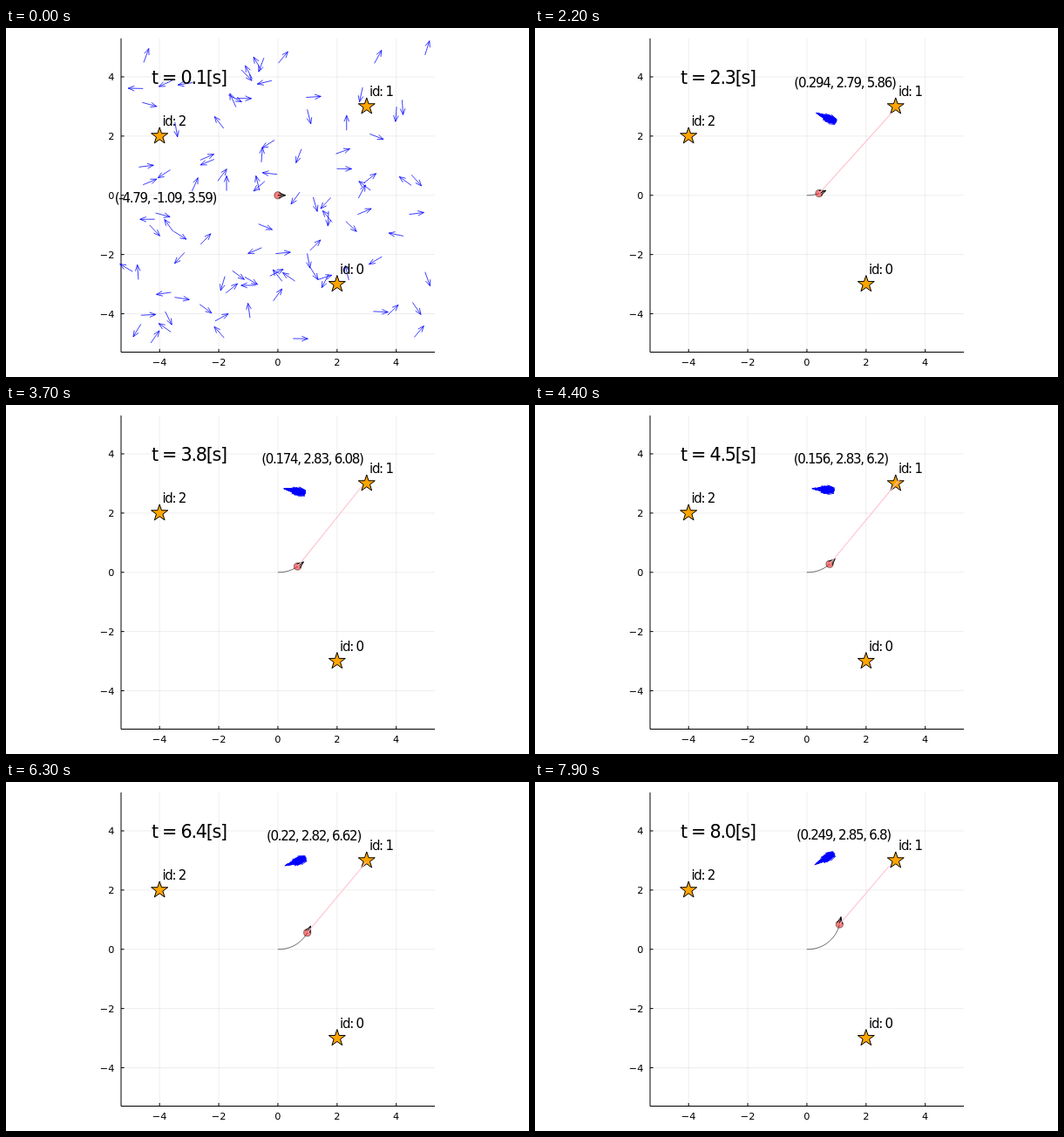
Animation of 600 by 400 pixels, one loop 8 s. Source, as an HTML page:

```html
<!DOCTYPE html>
<html lang="en">
<head>
<meta charset="utf-8">
<title>Particle filter localisation</title>
<style>
  html, body { margin: 0; width: 100%; height: 100%; overflow: hidden; background: #fff; }
  svg { display: block; width: 600px; height: 400px; }
  text { font-family: "DejaVu Sans", sans-serif; fill: #000; }
  .tick { font-size: 11.3px; }
  .note { font-size: 15px; letter-spacing: -.085em; text-anchor: middle; }
  .clock { font-size: 20.7px; letter-spacing: -.06em; text-anchor: middle; }
  path { fill: none; }
</style>
</head>
<body>
<svg id="stage" viewBox="0 0 600 400"></svg>
<script>
const STEP = 100, STEPS = 80, SCALE = 33.94, PARTICLES = 100;
const stage = document.getElementById("stage");
const px = x => 311.95 + x * SCALE;
const py = y => 191.75 - y * SCALE;
const rad = deg => deg * Math.PI / 180;

function add(tag, attrs, text) {
  const node = document.createElementNS("http://www.w3.org/2000/svg", tag);
  for (const key in attrs) node.setAttribute(key, attrs[key]);
  if (text !== undefined) node.textContent = text;
  return stage.appendChild(node);
}

function seeded(seed) {
  return () => {
    seed = (seed + 0x6D2B79F5) | 0;
    let n = Math.imul(seed ^ (seed >>> 15), 1 | seed);
    n = (n + Math.imul(n ^ (n >>> 7), 61 | n)) ^ n;
    return ((n ^ (n >>> 14)) >>> 0) / 4294967296;
  };
}

// Open-headed arrow from a tail point; angle is counterclockwise in radians.
function arrow(x, y, angle, length, head) {
  const at = (along, side) =>
    (x + along * Math.cos(angle) + side * Math.sin(angle)).toFixed(2) + " " +
    (y - along * Math.sin(angle) + side * Math.cos(angle)).toFixed(2);
  const back = length - head, wide = head * .4;
  return `M${at(0, 0)}L${at(length, 0)}M${at(back, wide)}L${at(length, 0)}L${at(back, -wide)}`;
}

// Axes
for (const v of [-4, -2, 0, 2, 4]) {
  const label = String(v).replace("-", "\u2212");
  add("path", { d: `M${px(v)} 12V371.5M132 ${py(v)}H492`, stroke: "#000", "stroke-opacity": .07 });
  add("path", { d: `M${px(v)} 371.5v-3.6M132 ${py(v)}h3.6`, stroke: "#000" });
  add("text", { class: "tick", x: px(v), y: 387, "text-anchor": "middle" }, label);
  add("text", { class: "tick", x: 124.5, y: py(v) + 4.2, "text-anchor": "end" }, label);
}
add("path", { d: "M132 12V371.5H492", stroke: "#000" });

const trail = add("path", { stroke: "#000", "stroke-width": .8, "stroke-opacity": .8 });
const body = add("circle", { r: 4.1, fill: "#f00", "fill-opacity": .5, stroke: "#000", "stroke-width": .8, "stroke-opacity": .6 });
const heading = add("path", { stroke: "#000", "stroke-width": 1 });

// Each particle starts anywhere on the map, then keeps its place in a narrow cloud.
const random = seeded(12);
const around = size => (random() * 2 - 1) * size;
const swarm = Array.from({ length: PARTICLES }, () => ({
  node: add("path", { stroke: "#00f", "stroke-width": .95, "stroke-opacity": .8 }),
  x: px(around(5)), y: py(around(5)), angle: around(Math.PI),
  along: random() ** .7, side: around(2.2), turn: around(.11)
}));

// Landmarks
[[2, -3], [3, 3], [-4, 2]].forEach(([x, y], id) => {
  const points = Array.from({ length: 10 }, (_, i) => {
    const r = i % 2 ? 3.9 : 10, a = rad(90 + i * 36);
    return [px(x) + r * Math.cos(a), py(y) - r * Math.sin(a)];
  });
  add("polygon", { points: points.join(" "), fill: "#ffa500", stroke: "#000", "stroke-width": 1 });
  add("text", { class: "note", x: px(x + .5) - .4, y: py(y + .5) + 5.3 }, "id: " + id);
});

const beam = add("path", { stroke: "#ffc0cb", "stroke-width": 1.1 });
const clock = add("text", { class: "clock", x: 209.9, y: 63.7 });
const guess = add("text", { class: "note" });

// Estimated pose over time: t, x, y, heading.
const lostPose = [-4.79, -1.09, 3.59];
const estimates = [
  [1.1, .442, 2.72, 5.66], [2.3, .294, 2.79, 5.86], [3.1, .191, 2.83, 5.97],
  [4.5, .156, 2.83, 6.2], [6.4, .22, 2.82, 6.62], [8, .249, 2.85, 6.8]
];
function estimateAt(t) {
  let i = 1;
  while (i < estimates.length - 1 && estimates[i][0] < t) i++;
  const a = estimates[i - 1], b = estimates[i];
  const k = (t - a[0]) / (b[0] - a[0]);
  return [1, 2, 3].map(j => a[j] + (b[j] - a[j]) * k);
}

// A short straight run, then a constant turn.
function robotAt(t) {
  const turn = rad(Math.max(0, t - .3) * 10), radius = 1.09;
  return {
    x: px(Math.min(.04, .2 * (t - .1)) + radius * Math.sin(turn)),
    y: py(radius * (1 - Math.cos(turn))),
    angle: rad((t - .1) * 10)
  };
}

// Noisy range and bearing to the visible landmark.
function sightingFrom(robot, step) {
  const noise = seeded(step * 97 + 5);
  const dx = px(3) - robot.x, dy = py(3) - robot.y;
  const length = Math.hypot(dx, dy) * (1 + (noise() + noise() - 1) * .13);
  const angle = Math.atan2(dy, dx) + (noise() - .5) * .05;
  return [robot.x + length * Math.cos(angle), robot.y + length * Math.sin(angle)];
}

function draw(ms) {
  const step = Math.floor(ms / STEP) % STEPS;
  const t = (step + 1) / 10, robot = robotAt(t);
  const pose = step ? estimateAt(t) : lostPose;
  const [x, y, angle] = pose;

  clock.textContent = `t = ${t.toFixed(1)}[s]`;
  guess.textContent = `(${pose.map(v => parseFloat(v.toPrecision(3))).join(", ")})`;
  guess.setAttribute("x", px(x + 1) - .4);
  guess.setAttribute("y", py(y + 1) + 5.3);

  body.setAttribute("cx", robot.x);
  body.setAttribute("cy", robot.y);
  heading.setAttribute("d", arrow(robot.x, robot.y, robot.angle, 8.6, 7.5));
  const path = Array.from({ length: step + 1 }, (_, i) => {
    const p = robotAt((i + 1) / 10);
    return p.x.toFixed(2) + " " + p.y.toFixed(2);
  });
  trail.setAttribute("d", "M" + path.join("L"));
  beam.setAttribute("d", step ? `M${robot.x} ${robot.y}L${sightingFrom(robot, step).join(" ")}` : "");

  const spread = Math.min(9.5, 4 + 2.2 * t);
  for (const p of swarm) {
    const ahead = p.along * spread, side = p.along * p.side;
    p.node.setAttribute("d", step
      ? arrow(
          px(x) + ahead * Math.cos(angle) + side * Math.sin(angle),
          py(y) - ahead * Math.sin(angle) + side * Math.cos(angle),
          angle + p.turn, 17, 7)
      : arrow(p.x, p.y, p.angle, 17, 7));
  }
}

const start = performance.now();
function tick() {
  draw(performance.now() - start);
  requestAnimationFrame(tick);
}
tick();
</script>
</body>
</html>
```
